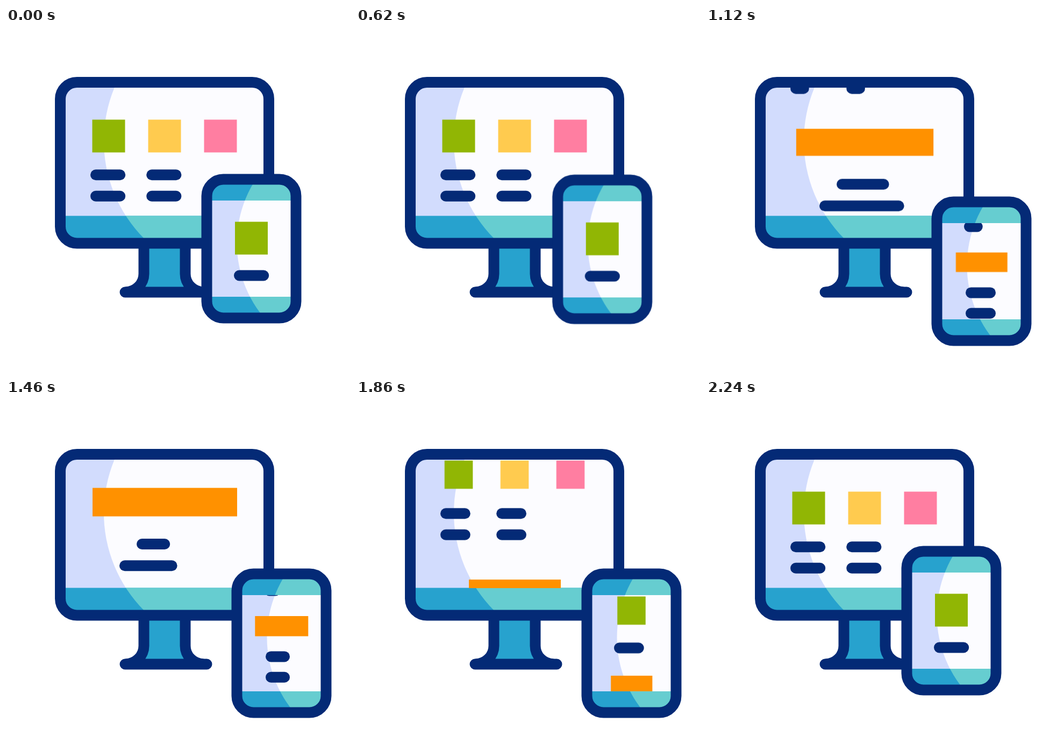
An HTML page without scripts for the animation above (2.4 s loop, 640 by 640 pixels).

```html
<!DOCTYPE html>
<html lang="en">
<head>
<meta charset="utf-8">
<title>Responsive layout</title>
<style>
  html, body { margin: 0; width: 100%; height: 100%; overflow: hidden; background: #fff; }
  svg { display: block; width: 100%; height: 100%; }

  .navy { fill: none; stroke: #042a76; stroke-width: 20; stroke-linecap: round; }
  .shade { fill: #d2dcfd; }
  .light { fill: #fcfcff; }
  .bar { fill: #27a2ce; }
  .bar-light { fill: #66cdd0; }
  .green { fill: #91b604; }
  .yellow { fill: #ffcb4f; }
  .pink { fill: #ff7ea1; }
  .orange { fill: #ff9100; }

  .phone, .scroll, .out, .in, .cut, .grow {
    animation: 2.4s cubic-bezier(.333, 0, .667, 1) infinite;
  }
  .phone { animation-name: phone; }
  .scroll { animation-name: scroll; }
  .out, .in { transform-box: fill-box; transform-origin: center; }
  .out { animation-name: out; }
  .in { animation-name: in; }
  .cut { animation-name: cut; }
  .grow { animation-name: grow; }

  /* hop, slide aside, return */
  @keyframes phone {
    0%, 8.3333% { transform: translate(0, 0); }
    16.6667% { transform: translate(0, -47.5px); }
    25% { transform: translate(0, 0); }
    33.3333%, 83.3333% { transform: translate(56px, 42px); }
    93.3333%, 100% { transform: translate(0, 0); }
  }
  @keyframes scroll {
    0%, 33.3333% { transform: translateY(0); }
    50%, 66.6667% { transform: translateY(var(--up)); }
    83.3333%, 100% { transform: translateY(0); }
  }
  @keyframes out {
    0%, 33.3333% { transform: scale(1); }
    50%, 66.6667% { transform: scale(.5); }
    83.3333%, 100% { transform: scale(1); }
  }
  @keyframes in {
    0%, 33.3333% { transform: scale(var(--from)); }
    50%, 66.6667% { transform: scale(1); }
    83.3333%, 100% { transform: scale(var(--from)); }
  }
  @keyframes cut {
    0%, 33.3333% { stroke-dasharray: 100 300; }
    50%, 66.6667% { stroke-dasharray: 25 300; }
    83.3333%, 100% { stroke-dasharray: 100 300; }
  }
  @keyframes grow {
    0%, 33.3333% { stroke-dasharray: 25 300; }
    50% { stroke-dasharray: 100 300; }
    58.3333% { stroke-dasharray: var(--min) 300; }
    66.6667% { stroke-dasharray: 100 300; }
    83.3333%, 100% { stroke-dasharray: 25 300; }
  }
</style>
</head>
<body>
<svg viewBox="0 0 640 640">
  <defs>
    <clipPath id="screen"><rect x="101" y="101" width="388" height="299.5" rx="31"/></clipPath>
    <clipPath id="page"><rect x="111" y="111" width="368" height="238.5"/></clipPath>
    <clipPath id="desk"><rect x="101" y="349.5" width="388" height="51"/></clipPath>
    <clipPath id="case"><rect x="373.5" y="281.5" width="166" height="258" rx="31"/></clipPath>
    <clipPath id="view"><rect x="383.5" y="321" width="146" height="179"/></clipPath>
    <clipPath id="ends"><path d="M373 281h167v40H373zM373 500h167v40H373z"/></clipPath>
  </defs>

  <!-- stand -->
  <path class="bar" d="M256.5 400V457A34 34 0 0 1 245 482H345A34 34 0 0 1 333.5 457V400z"/>
  <path class="navy" d="M256.5 405V457A34 34 0 0 1 222.5 491.2M333.5 405V457A34 34 0 0 0 367.5 491.2M221.5 491.5H373.5"/>

  <!-- monitor -->
  <g clip-path="url(#screen)">
    <rect class="shade" x="101" y="101" width="388" height="300"/>
    <circle class="light" cx="440" cy="210" r="258"/>
    <g clip-path="url(#desk)">
      <rect class="bar" x="101" y="349" width="388" height="52"/>
      <circle class="bar-light" cx="440" cy="210" r="258"/>
    </g>
  </g>
  <g clip-path="url(#page)">
    <g class="scroll" style="--up: -223px">
      <rect class="green out" x="160.5" y="170.5" width="61" height="61"/>
      <rect class="yellow out" x="264.5" y="170.5" width="61" height="61"/>
      <rect class="pink out" x="368.5" y="170.5" width="61" height="61"/>
      <path class="navy cut" pathLength="100" d="M167 273.2h45.2"/>
      <path class="navy cut" pathLength="100" d="M167 312.7h45.2"/>
      <path class="navy cut" pathLength="100" d="M271.2 273.2h45.2"/>
      <path class="navy cut" pathLength="100" d="M271.2 312.7h45.2"/>
      <rect class="orange in" style="--from: .5" x="161" y="386.5" width="269" height="53"/>
      <path class="navy grow" style="--min: 36" pathLength="100" d="M253 491h84"/>
      <path class="navy grow" style="--min: 47" pathLength="100" d="M221 531.2h149"/>
    </g>
  </g>
  <rect class="navy" x="101" y="101" width="388" height="299.5" rx="31"/>

  <!-- phone -->
  <g class="phone">
    <g clip-path="url(#case)">
      <rect class="shade" x="373" y="281" width="167" height="259"/>
      <circle class="light" cx="646.5" cy="400" r="217"/>
      <g clip-path="url(#ends)">
        <rect class="bar" x="373" y="281" width="167" height="259"/>
        <circle class="bar-light" cx="646.5" cy="400" r="217"/>
      </g>
    </g>
    <g clip-path="url(#view)">
      <g class="scroll" style="--up: -148px">
        <rect class="green out" x="426" y="360.5" width="61" height="61"/>
        <path class="navy cut" pathLength="100" d="M434 460.5h45.2"/>
        <rect class="orange in" style="--from: .695" x="407.3" y="508" width="99" height="37.5"/>
        <path class="navy grow" style="--min: 54" pathLength="100" d="M437 583.4h39"/>
        <path class="navy grow" style="--min: 54" pathLength="100" d="M437 621.8h39"/>
      </g>
    </g>
    <rect class="navy" x="373.5" y="281.5" width="166" height="258" rx="31"/>
  </g>
</svg>
</body>
</html>
```
